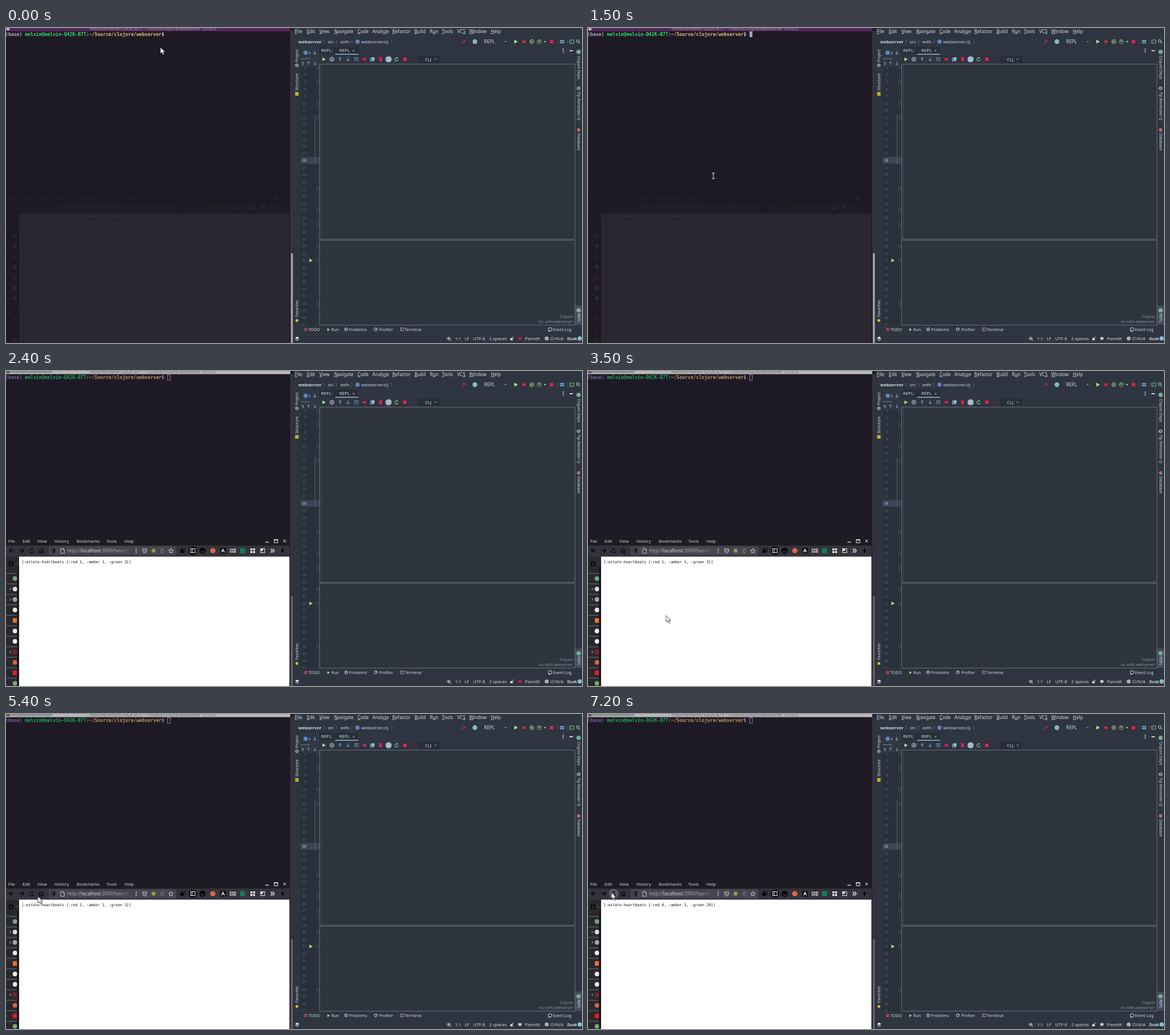
These frames come from a looping animation (1011 by 554 pixels, 8000 ms). An HTML page:

```html
<!DOCTYPE html>
<html lang="en">
<head>
<meta charset="utf-8">
<title>Web server demo</title>
<style>
html, body { margin: 0; width: 100%; height: 100%; overflow: hidden; background: #1e1a25; }
svg { display: block; width: 100vw; height: 100vh; }
text { font-family: "Noto Sans", "Open Sans", sans-serif; white-space: pre; }
.mono { font-family: "DejaVu Sans Mono", "Noto Sans Mono", monospace; }
.u { text-decoration: underline; text-decoration-thickness: .6px; }
.anim { animation: 8s step-end -10ms infinite; }
.browser { animation-name: browser; }
.focused { animation-name: early; }
.blurred { animation-name: late; }
.block { animation-name: block; }
.bug { animation-name: bug; }
.hover { animation-name: hover; }
.before { animation-name: before; }
.after { animation-name: after; }
.mouse { animation-name: mouse; }
.arrow { animation-name: arrow; }
.beam { animation-name: beam; }
@keyframes browser { 0% { opacity: .06 } 30%, to { opacity: 1 } }
@keyframes early { 0% { opacity: 1 } 30%, to { opacity: 0 } }
@keyframes late { 0% { opacity: 0 } 30%, to { opacity: 1 } }
@keyframes block { 0%, 12.5%, 28.75%, to { opacity: 0 } 6.25%, 18.75% { opacity: 1 } }
@keyframes bug {
  0%, 23.75%, 55%, 76.25% { fill: #d8174f; stroke: #d8174f }
  11.25%, 36.25%, 65%, 87.5%, to { fill: #c9ced8; stroke: #c9ced8 }
}
@keyframes hover { 0% { opacity: 0 } 75%, to { opacity: 1 } }
@keyframes before { 0% { opacity: 1 } 80%, to { opacity: 0 } }
@keyframes after { 0% { opacity: 0 } 80%, to { opacity: 1 } }
@keyframes arrow { 0%, 36.25%, 40%, to { opacity: 1 } 1.25%, 23.75%, 37.5% { opacity: 0 } }
@keyframes beam { 0%, 23.75%, 40%, to { opacity: 0 } 1.25%, 37.5% { opacity: 1 } }
@keyframes mouse {
  0% { transform: translate(271px, 34px) }
  1.25% { transform: translate(292px, 80px) }
  2.5% { transform: translate(310px, 145px) }
  3.75% { transform: translate(287px, 178px) }
  6.25% { transform: translate(277px, 172px) }
  16.25% { transform: translate(330px, 250px) }
  17.5% { transform: translate(415px, 404px) }
  18.75% { transform: translate(220px, 260px) }
  20% { transform: translate(58px, 120px) }
  22.5% { transform: translate(28px, 103px) }
  23.75% { transform: translate(-40px, 100px) }
  36.25% { transform: translate(2px, 0px) }
  37.5% { transform: translate(102px, 248px) }
  40% { transform: translate(126px, 380px) }
  41.25% { transform: translate(152px, 470px) }
  43.75% { transform: translate(137px, 430px) }
  57.5% { transform: translate(121px, 432px) }
  62.5% { transform: translate(113px, 412px) }
  63.75% { transform: translate(100px, 386px) }
  65% { transform: translate(84px, 355px) }
  66.25% { transform: translate(66px, 333px) }
  67.5% { transform: translate(56px, 321px) }
  68.75% { transform: translate(51px, 319px) }
  70% { transform: translate(47px, 317px) }
  72.5% { transform: translate(44px, 316px) }
  75% { transform: translate(40px, 314px) }
  86.25% { transform: translate(43px, 316px) }
  90%, to { transform: translate(41px, 314px) }
}
</style>
</head>
<body>
<svg id="stage" viewBox="0 0 1011 554" preserveAspectRatio="none"></svg>
<script>
const FG = '#d5dae3', DIM = '#8b93a1', GREEN = '#a6e08a', RED = '#e0224f', TEAL = '#88c0d0', BLUE = '#81a1c1';
const EDGE = '#666d78', DARK = '#282e39';

const rect = (x, y, w, h, fill, more = '') => `<rect x="${x}" y="${y}" width="${w}" height="${h}" fill="${fill}" ${more}/>`;
const dot = (x, y, r, fill, more = '') => `<circle cx="${x}" cy="${y}" r="${r}" fill="${fill}" ${more}/>`;
const line = (d, color, w = 1, fill = 'none') => `<path d="${d}" stroke="${color}" stroke-width="${w}" fill="${fill}"/>`;
const text = (x, y, size, fill, s, more = '') => `<text x="${x}" y="${y}" font-size="${size}" fill="${fill}" ${more}>${s}</text>`;
const span = (fill, s) => `<tspan fill="${fill}">${s}</tspan>`;
const group = (cls, ...parts) => `<g class="${cls}">${parts.join('')}</g>`;
const each = (list, fn) => list.map(fn).join('');
const ring = (x, y, r, color, w = 1) => dot(x, y, r, 'none', `stroke="${color}" stroke-width="${w}"`);
const box = (x, y, w, h, color) => rect(x, y, w, h, 'none', `stroke="${color}"`);
const play = (x, y, r, color) => line(`M${x - r * .8} ${y - r}L${x + r} ${y}L${x - r * .8} ${y + r}z`, 'none', 0, color);
const vert = (x, y, dir, color) => line(`M${x} ${y - 3 * dir}v${6 * dir}m-2.3 ${-2.3 * dir}l2.3 ${2.3 * dir}l2.3 ${-2.3 * dir}`, color);
const drop = (x, y, color) => line(`M${x - 2} ${y - 1}h4l-2 2.4z`, 'none', 0, color);
const cross = (x, y, r, color) => line(`M${x - r} ${y - r}l${2 * r} ${2 * r}m0 ${-2 * r}l${-2 * r} ${2 * r}`, color);
const insect = (x, y, color) => dot(x, y, 2.5, color) + line(`M${x - 3.3} ${y - 2}l6.6 4M${x - 3.3} ${y + 2}l6.6 -4M${x - 3.3} ${y}h6.6`, color, .8);
const turn = (x, y, r, color) => line(`M${x + r} ${y}a${r} ${r} 0 1 1 -${r} -${r}h2`, color, 1.2) + line(`M${x} ${y - r - 2}l3 2l-3 2z`, 'none', 0, color);
const side = (x, y, deg, s) => text(0, 0, 6.9, FG, s, `transform="translate(${x} ${y}) rotate(${deg})"`);

function terminal(on) {
  const user = 'melvin', host = 'melvin-Q42K-B7T', dir = '~/Source/clojure/webserver';
  const [base, green, path, sign] = on
    ? ['#b3a8c8', '#35dc70', '#e2bd78', '#c9c0d6'] : ['#76609a', '#20a45c', '#bf9163', '#9b8aa8'];
  return group('anim ' + (on ? 'focused' : 'blurred'),
    rect(0, 0, 499, 5.5, on ? '#54285a' : '#b8b8b8'),
    on ? '' : rect(0, 0, 82, 3.5, '#8e8e8e', 'rx="2"'),
    rect(1, .5, 5, 3.5, on ? '#d8cbd9' : '#4d4d4d'),
    text(258, 4, 7.6, on ? '#a999ad' : '#646464', `${user}@${host}: ${dir} 101x55`, 'text-anchor="middle"'),
    `<text class="mono" x="-1" y="14.4" font-size="8.14" font-weight="700">${span(base, '(base) ')}${span(green, `${user}@${host}`)}${span(sign, ':')}${span(path, dir)}${span(sign, '$')}</text>`,
    rect(500, 396, 3.6, 158, on ? '#a09fa8' : '#625f69', 'rx="1.5"'),
    on ? '' : box(283.6, 6.5, 4.8, 9.5, '#8c819d'));
}

function browserChrome() {
  const menus = [[4, 'File'], [29, 'Edit'], [55, 'View'], [85, 'History'], [124, 'Bookmarks'], [176, 'Tools'], [208, 'Help']];
  return rect(0, 291, 498, 16, '#1d1c23') + rect(0, 307, 498, 20, '#34333b')
    + each(menus, ([x, s]) => text(x, 301.8, 7.6, '#d4d3da', s))
    + line('M455.5 301h6', '#eee', 1.3) + box(471, 296.5, 6, 5.5, '#eee') + line('M470.5 297h7', '#eee', 1.5) + cross(489, 299, 2.4, '#eee')
    + line('M14 316h-8m3.5 -3.5l-3.5 3.5l3.5 3.5M23 316h8m-3.5 -3.5l3.5 3.5l-3.5 3.5', '#08080b', 1.7)
    + group('anim hover', dot(45, 316, 8.5, '#5b5a63'))
    + turn(45, 316.5, 3.4, '#08080b')
    + line('M57.5 316.5l4.5 -4l4.5 4M59 316v4h2v-2.5h2v2.5h2v-4', '#08080b', 1.2)
    + rect(75, 308, 223.5, 16, '#46454e', 'rx="2"')
    + line('M80 313.5l3 -1.5l3 1.5v3q-.5 2.5 -3 4q-2.5 -1.5 -3 -4z', '#111', 1) + line('M83 312v8.5q2.5 -1.5 3 -4v-3z', 'none', 0, '#111')
    + line('M96 312h4l2.5 2.5v6h-6.5zM100 312v2.5h2.5', '#c8c7ce', .9)
    + `<text x="107.5" y="319" font-size="8.2">${span('#a8a7ae', 'http://')}${span('#dedde3', 'localhost')}${span('#a8a7ae', ':3999/heartb')}</text>`
    + rect(198, 309, 26, 14, 'url(#fade)') + rect(219, 309, 6, 14, '#46454e')
    + each([313, 316, 319], y => dot(228.5, y, .9, '#ddd'))
    + line('M240 313h7v3q-1 4 -3.5 4t-3.5 -4zM241.8 315.5l1.7 1.7l1.7 -1.7', '#ddd', 1)
    + dot(259, 316, 3.5, '#8b9d48') + turn(274.5, 316.5, 2.8, '#77767d')
    + line('M289.5 312l1.2 2.7l2.8 .3l-2 2l.5 3l-2.5 -1.5l-2.5 1.5l.5 -3l-2 -2l2.8 -.3z', '#ddd', .9)
    + rect(306, 314, 6, 6, '#08080b') + box(308.5, 312, 6, 5.5, '#08080b')
    + dot(328, 316, 7.5, '#09090c') + box(324, 312.5, 8, 7, '#eee') + line('M326.7 312.5v7', '#eee')
    + dot(345, 316, 5.5, '#09090c') + line('M342 317.5q3 2 6 0', '#777', .8)
    + dot(363, 316, 4.6, '#dc6841')
    + rect(376, 311, 10, 10, '#111') + text(377.7, 319.4, 9, '#fff', 'A', 'font-weight="600"')
    + line('M393.5 312v8M397 312v8M400.5 312v8M403 312v8M393 314h10M393 318h10', '#e8e8ea', .9)
    + rect(410.7, 311.5, 9, 9, '#167c5b', 'rx="1"')
    + each([[429, 312], [433.7, 312], [429, 316.7], [433.7, 316.7]], ([x, y]) => rect(x, y, 3.4, 3.4, '#f0f0f2'))
    + box(447, 312.5, 7, 7, '#eee') + rect(447, 312.5, 3.8, 3.8, '#eee')
    + line('M464.5 312.5l3 3.5l-3 3.5M468 312.5l3 3.5l-3 3.5', '#eee', 1.3)
    + line('M485.5 311.5l2.4 4.5l-2.4 4.5l-2.4 -4.5z', 'none', 0, '#08080b');
}

function browser() {
  const marks = ['#73a789', '#dcdce0', '#a5a5a9', '#ededf0', '#e97332', '#ededf0', '#ededf0', '#7b2327', '#d76642', '#e51d1d', '#70ad68'];
  const square = [4, 7, 9];
  const body = s => `[:estate-heartbeats {${s}}]`;
  const icon = (color, i) => {
    const y = 365 + i * 18.43;
    return line(`M1 ${y - 9}h18`, '#87868d', .8)
      + (square.includes(i) ? rect(12, y - 4, 7.5, 8, color) : dot(15.8, y, 4, color))
      + ([1, 2, 7].includes(i) ? line(`M6.5 ${y - 2}l2 2l-2 2`, '#ccc') : '');
  };
  return group('anim browser',
    browserChrome(),
    rect(0, 327, 23, 227, '#29282f'), rect(19.5, 345, 3, 209, '#18171f'),
    rect(5, 335, 8, 8, '#08080b', 'rx="1"'), line('M7 338h4M7 340.5h4', '#777', .7), line('M17 338l2 1.5', '#999', .8),
    `<g clip-path="url(#strip)">${marks.map(icon).join('')}</g>`,
    rect(23, 326.5, 474.5, 227.5, '#fff'),
    ...[['before', ':red 1, :amber 1, :green 3'], ['after', ':red 0, :amber 3, :green 29']].map(([cls, s]) =>
      text(27.5, 337.6, 6.53, '#111', body(s), `class="mono anim ${cls}"`)));
}

function ideTop() {
  // Each menu carries the index of its underlined letter.
  const menus = [[507, 'File', 0], [528, 'Edit', 0], [550, 'View', 0], [576, 'Navigate', 0], [617, 'Code', 0], [643, 'Analyze', 5],
    [678, 'Refactor', 0], [717, 'Build', 0], [744, 'Run', 1], [765, 'Tools', 0], [792, 'VCS', 2], [813, 'Window', 0], [851, 'Help', 0]];
  const mark = (s, i) => `${s.slice(0, i)}<tspan class="u">${s[i]}</tspan>${s.slice(i + 1)}`;
  return each(menus, ([x, s, i]) => text(x, 8.5, 8.1, FG, mark(s, i)))
    + text(513, 26.7, 7.8, FG, 'webserver', 'font-weight="700"') + text(565, 26.7, 7.8, FG, 'src')
    + text(587, 26.7, 7.8, FG, 'exfn') + text(623.5, 26.7, 7.9, FG, 'webserver.clj')
    + each([557, 579, 606, 676], x => line(`M${x} 20.5l2 3.5l-2 3.5`, '#69717f', .9))
    + dot(617, 24, 3.7, '#5b86c5')
    + line('M800 27.5l5.5 -5.5m-3 -1.5l4.5 4', '#c62852', 1.4)
    + dot(823, 24, 4.2, '#88b8ba') + text(839, 26.8, 8.3, FG, 'REPL') + drop(877, 24, DIM)
    + play(895, 24, 3.6, GREEN) + insect(909, 24, RED) + ring(923, 24, 3.5, '#c6d779') + play(923, 24, 1.8, '#c6d779')
    + ring(936, 24, 3.6, '#79b987') + dot(936, 23, 1.6, '#79b987') + drop(946, 24, FG) + rect(954.5, 21, 6, 6, RED)
    + line('M967.5 20v8M985.5 20v8', '#434c5e')
    + each([0, 1, 2], i => rect(972.5 + i * 2.6, 21, 2, 2.6, '#72b5d9') + rect(972.5 + i * 2.6, 24.4, 2, 2.6, '#72b5d9'))
    + box(989.5, 21, 7, 6, '#79b987') + line('M991 22.5l1.5 1.5l-1.5 1.5', '#79b987', .8)
    + ring(1003.5, 23, 2.4, FG) + line('M1005.2 24.8l2.5 2.5', FG);
}

function ideTools() {
  return rect(517, 33, 33, 35, '#303744') + dot(526, 43.5, 3.8, '#5b86c5') + line('M534 42l-1.5 2l1.5 2', FG)
    + vert(542, 43.5, 1, TEAL) + line('M517 54h17', '#69717f', 1.3)
    + text(519, 64.6, 6.8, FG, '5') + vert(531, 62, -1, BLUE) + vert(542.5, 62, 1, BLUE)
    + rect(550, 33, 449, 14, '#2f3642') + rect(550, 33, 68, 13, DARK)
    + text(553, 42.4, 7.9, FG, 'REPL:') + text(585, 42.4, 7.9, FG, 'REPL') + cross(610, 40, 1.6, DIM)
    + rect(578, 45.5, 40, 1.5, TEAL) + each([37, 39.7, 42.4], y => dot(978, y, .9, FG)) + line('M989 40h6', '#fff', 1.5)
    + play(558, 55, 3.3, GREEN) + ring(572, 55, 3.5, FG) + cross(572, 55, 1.5, FG)
    + vert(586.5, 55, -1, TEAL) + vert(600.5, 55, 1, TEAL)
    + line('M611 52.5h8M611 55h6.5q1.8 1.2 0 2.7h-2M611 57.7h2.5', BLUE)
    + insect(629, 55, RED) + rect(641.5, 51.5, 5.5, 5.5, '#6fb8d6') + box(639.8, 53, 5, 5, '#a9cfe0')
    + rect(655, 53, 5, 5.5, RED) + line('M654 51.8h7', RED, 1.2)
    + dot(671.5, 55, 5.8, '#7f9ab1') + box(668.8, 52.3, 5.4, 5.4, '#e5e9f0') + line('M671.5 53.5v3', '#e5e9f0')
    + turn(685.5, 55.3, 2.8, '#79b987') + rect(697, 52, 6, 6, RED) + cross(714, 55, 2, '#7c2742')
    + rect(723, 48.5, 39, 13, DARK) + text(735.5, 57.7, 7.7, FG, 'CLJ') + drop(754, 55, DIM);
}

function gutter() {
  const y = n => 82 + (n - 6) * 12.57;
  const rows = Array.from({ length: 37 }, (_, i) => i + 5);
  const folds = [5, 7, 10, 12, 18, 22, 25, 27, 30, 32, 38];
  return `<g clip-path="url(#gutter)">` + rect(517, 68, 33, 456, '#2a303b') + rect(517, y(18) - 6, 33, 12, '#3c4455')
    + each(rows, n => text(527, y(n) + 2.4, 6.3, n === 18 ? FG : '#566074', n, 'class="mono" text-anchor="end"'))
    + line('M542.5 152v87', '#56635f') + line('M547.5 68v455', '#363e4b', .7)
    + each(folds, n => box(545.3, y(n) - 2.2, 4, 4.4, '#434b59'))
    + '</g>' + play(535, y(32), 3.2, GREEN);
}

function ideSides() {
  return side(513.4, 60, -90, 'Project') + ring(510.5, 65.5, 2.5, FG) + dot(510.5, 65.5, 1, FG)
    + side(513.4, 110, -90, 'Structure') + rect(507.5, 113, 6, 2.5, '#e5d42e') + rect(507.5, 116.2, 6, 2.5, '#e5d42e')
    + side(513.4, 508, -90, 'Favorites') + line('M510.5 511l1 2.1l2.3 .2l-1.7 1.6l.5 2.3l-2.1 -1.2l-2.1 1.2l.5 -2.3l-1.7 -1.6l2.3 -.2z', 'none', 0, '#efcf37')
    + dot(1005, 42, 3.8, '#79ad92') + side(1002.6, 49, 90, 'Clojure Deps')
    + ring(1005, 106, 2.6, FG) + line('M1003 106h4', FG, .8) + side(1002.6, 112, 90, 'Tip Reminder Q')
    + rect(1002.5, 176.5, 5, 5.5, '#d08770', 'rx="1"') + line('M1002.5 178.4h5M1002.5 180.3h5', '#6f4b40', .6) + side(1002.6, 185, 90, 'Database')
    + rect(999, 488, 12, 34, '#434c5e') + dot(1005, 496.5, 3.8, '#79ad92') + side(1002.6, 502, 90, 'REPL');
}

function ideBottom() {
  const tabs = [[531, 'TODO'], [571, 'Run'], [602, 'Problems'], [655, 'Profiler'], [700, 'Terminal'], [960, 'Event Log']];
  const status = [[788, '1:1'], [805, 'LF'], [820, 'UTF-8'], [848, '2 spaces'], [911, 'Paredit'], [955, '∅/N/A']];
  return each(tabs, ([x, s]) => text(x, 532.8, 7.1, FG, s)) + each(status, ([x, s]) => text(x, 548.8, 7.75, FG, s))
    + text(985, 548.6, 6.9, FG, 'Dusk', 'font-weight="700"')
    + rect(523.5, 527.5, 5, 5.5, '#b34d5c') + line('M524.5 529.3h3M524.5 531.3h3', '#2e3440', .7)
    + play(566, 530.5, 2.4, GREEN) + ring(597, 530, 2.6, FG) + line('M597 528.5v2.5', FG)
    + ring(649, 530, 2.6, FG) + line('M649 530l2 -2', FG) + box(692.5, 527.5, 5.5, 5, '#b48ead') + line('M694 529l1 1l-1 1', '#b48ead', .7)
    + ring(955, 530, 3.1, FG) + line('M952.5 532v1.5h2.5', FG)
    + line('M507.5 545l3.5 -2.3l3.5 2.3l-3.5 2.3z', 'none', 0, '#eceff4') + line('M507.5 547.3l3.5 2.2l3.5 -2.2', '#eceff4')
    + line('M773.5 546q3.5 -4.5 7 0q-3.5 4 -7 0M778 548l3.5 2', FG, .9) + dot(777, 546, 1.2, FG)
    + rect(885, 545.5, 4.5, 3.7, FG) + line('M888.5 545.5v-1.5q1.2 -2 2.4 0v1', FG, .8)
    + group('anim bug', '<circle cx="902" cy="546" r="2.2"/><path stroke-width=".8" d="M899 543.5l6 5M899 548.5l6 -5M898.7 546h6.6"/>')
    + dot(949, 546, 3.5, '#abb1bb') + dot(1007, 546, 3.8, TEAL);
}

const ide = () => rect(504.5, 0, 507, 554, '#2e3440')
  + ideTop() + line('M505 33.5h506', '#282e38') + ideTools() + gutter()
  + rect(550.5, 63.5, 448, 308, '#2d343e', `stroke="${EDGE}"`) + line('M553.5 64v307', '#4b5360', .7)
  + rect(550.5, 373.5, 448, 149, '#2d343e', `stroke="${EDGE}"`)
  + text(995, 510, 6.9, DIM, 'Clojure', 'text-anchor="end"') + text(995, 518.7, 6.8, DIM, 'ns: exfn.webserver', 'text-anchor="end"')
  + ideSides() + ideBottom();

const mouse = () => {
  const tip = 'M0 0v11l2.6 -2.3l1.9 4.2l2 -.9l-1.8 -4h3.4z';
  return group('anim mouse',
    group('anim arrow', `<path d="${tip}" transform="translate(1.8 2)" opacity=".25"/>`, line(tip, '#333', .8, '#fff')),
    group('anim beam', line('M-3 -5h2.2l.8 .8l.8 -.8h2.2M0 -4.2v8.6M-3 5h2.2l.8 -.8l.8 .8h2.2', '#f2f2f2', 1)));
};

document.getElementById('stage').innerHTML = `<defs>
  <clipPath id="strip"><path d="M0 327h19.5v227h-19.5z"/></clipPath>
  <clipPath id="gutter"><path d="M517 68h33v455h-33z"/></clipPath>
  <linearGradient id="fade"><stop stop-color="#46454e" stop-opacity="0"/><stop offset=".85" stop-color="#46454e"/></linearGradient>
</defs>` + rect(0, 0, 505, 554, '#1e1a25') + rect(499, 5, 5.5, 549, '#36333b') + browser()
  + terminal(true) + terminal(false) + group('anim block', rect(283.5, 6, 5, 10, '#afa3c2')) + ide() + mouse();
</script>
</body>
</html>
```
